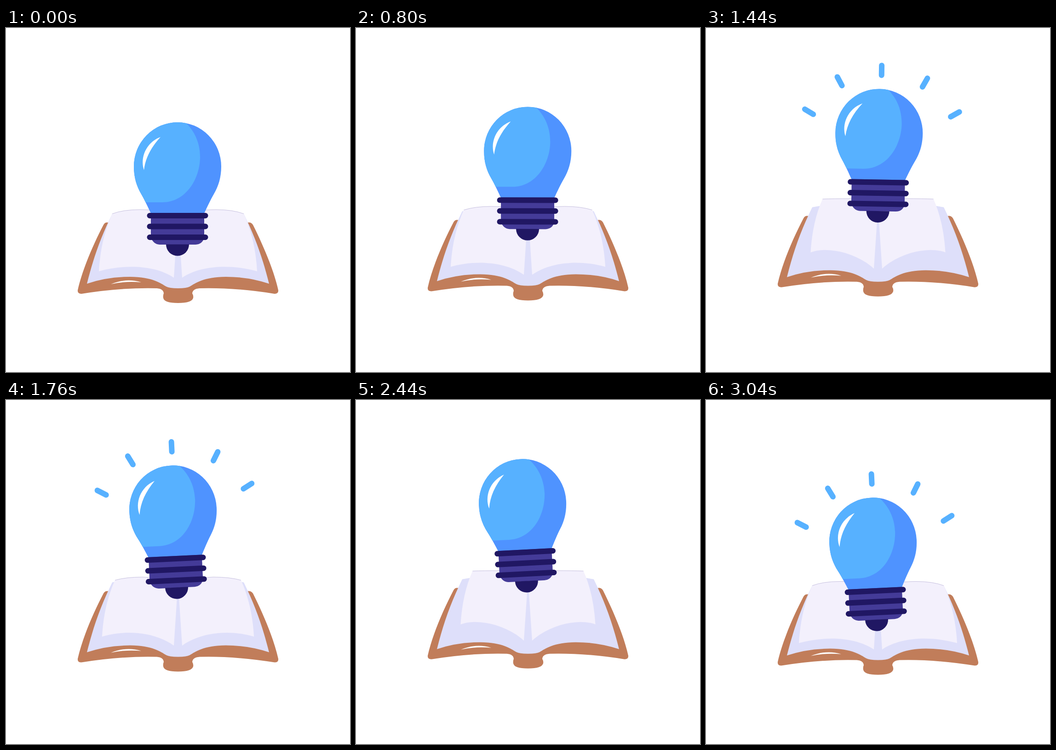
An HTML page that plays this animation: 748 by 748 pixels, repeating every 3080 ms.

```html
<!DOCTYPE html>
<html lang="en">
<head>
<meta charset="utf-8">
<title>Bulb over a book</title>
<style>
html, body { margin: 0; width: 100%; height: 100%; overflow: hidden; background: #fff; }
svg { display: block; width: 100vw; height: 100vh; }
</style>
</head>
<body>
<svg viewBox="0 0 748 748">
  <defs>
    <path id="glass" d="M315 403C309 390 301 373 294 361C284 344 278 325 278 301A95 96 0 0 1 468 301C468 325 462 344 452 361C445 373 437 390 431 403Z"/>
    <clipPath id="inside"><use href="#glass"/></clipPath>
    <g id="page">
      <path id="sheet" fill="#f3f0fc"/>
      <path id="rim" fill="none" stroke="#c6c0df"/>
    </g>
  </defs>

  <g id="book">
    <path fill="#c17d5a" d="M222 423Q215 422 212 428C190 470 166 525 156 570Q155 578 164 578Q250 564 328 566Q342 567 343 577Q341 582 342 587Q344 598 374 598Q404 598 407 587Q408 582 405 577Q406 567 421 566Q498 564 584 578Q593 578 592 570C582 525 558 470 537 428Q533 422 526 423Z"/>
    <path fill="#fff" d="M228 557Q262 543 294 553Q258 550 228 557Z"/>
    <path fill="#dedffa" d="M231 404C206 455 190 500 176 556Q220 541 270 541C318 541 338 556 348 562Q355 566 374 566Q393 566 400 562C410 556 430 541 478 541Q528 541 572 556C558 500 542 455 517 404Q480 397 450 399Q400 402 374 414Q348 402 298 399Q268 397 231 404Z"/>
    <use href="#page"/>
    <use href="#page" transform="matrix(-1 0 0 1 748 0)"/>
  </g>

  <g id="bulb">
    <g id="rays" stroke="#57b1ff" stroke-width="12" stroke-linecap="round"></g>
    <use href="#glass" fill="#4f93ff"/>
    <path clip-path="url(#inside)" fill="#57b1ff" d="M392 200V207C412 227 422 252 422 282C421 330 390 379 340 379H250V200Z"/>
    <path fill="#fff" d="M336 237C304 249 291 283 300 309C303 283 315 260 336 237Z"/>
    <path fill="#443b98" d="M315 402H431V455Q428 470 412 471H334Q320 470 315 455Z"/>
    <path stroke="#201763" stroke-width="12" stroke-linecap="round" d="M312.5 408H433.5M312.5 431.5H433.5M312.5 455H433.5"/>
    <path fill="#201763" d="M348 470.5H398A25 25 0 0 1 348 470.5Z"/>
  </g>
</svg>
<script>
const LOOP = 3080, STEP = 40;
const el = id => document.getElementById(id);

// Knots: time in ms, value
const topY = [[0, 205], [360, 128], [540, 127], [600, 129], [1000, 208], [1200, 177], [1520, 127], [1640, 128],
  [1720, 135], [1760, 142], [1970, 196], [2160, 161.5], [2400, 128], [2520, 128], [2720, 154.5], [2940, 211], [3040, 212]];
const tilt = [[0, 0], [360, -3.07], [700, 0.9], [1040, -3], [1200, -2.44], [1440, 0.9], [1760, -2.7],
  [2130, 0.9], [2160, 0.8], [2460, -3], [2720, -0.8], [2850, 0.5], [3040, -2.7]];

// Hermite curve through the knots, flat at turning points
function curve(knots, t) {
  const last = knots.length - 1;
  const slope = i => {
    if (i === 0 || i === last) return 0;
    const [a, b, c] = knots.slice(i - 1, i + 2);
    const left = (b[1] - a[1]) / (b[0] - a[0]), right = (c[1] - b[1]) / (c[0] - b[0]);
    return left * right > 0 ? 2 * left * right / (left + right) : 0;
  };
  let i = 0;
  while (i < last - 1 && t >= knots[i + 1][0]) i++;
  const [t0, v0] = knots[i], [t1, v1] = knots[i + 1];
  const d = t1 - t0, u = Math.min(1, (t - t0) / d), w = 1 - u;
  return v0 * w * w * (1 + 2 * u) + v1 * u * u * (3 - 2 * u) + d * u * w * (slope(i) * w - slope(i + 1) * u);
}

el("rays").innerHTML = [[220, 257, 30], [285.5, 189.7, 61], [376.5, 164.5, 90], [471, 189.6, 119], [537.5, 257.7, 150]]
  .map(([x, y, a]) => `<path d="M-10.7 0H10.7" transform="translate(${x} ${y}) rotate(${a})"/>`).join("");

function drawBook(t) {
  const p = t % 1000 / 1000;
  const lift = 7.3 * (1 - Math.cos(2 * Math.PI * (Math.min(p, 1 - p) + 0.012)));
  const s = lift * lift / 8;   // how far the loose pages draw in
  const x = 231 + 0.88 * s, y = 404 - 0.7 * s, peak = 395 - 0.38 * s;
  const edge = `M${x} ${y}Q${x + 24} ${peak} ${x + 60} ${peak}Q345 ${peak} 373.5 412`;
  el("rim").setAttribute("d", edge);
  el("sheet").setAttribute("d", `${edge}L365 ${543 - 0.22 * s}C325 ${516 - 0.6 * s} 260 ${513 - 0.95 * s} ${202 + s} ${529 - 1.05 * s}Q${206 + s} ${458 - 0.9 * s} ${x} ${y}Z`);
  el("book").setAttribute("transform", `translate(0 ${-lift})`);
}

function draw(now) {
  const t = Math.floor(now % LOOP / STEP) * STEP;
  drawBook(t);
  el("bulb").setAttribute("transform", `translate(0 ${curve(topY, t) - 205}) rotate(${curve(tilt, t)} 373 512)`);
  const blink = t % 400;
  el("rays").style.display = blink >= 120 && blink < 320 ? "" : "none";
}

let start;
function tick(now) {
  start ??= now;
  draw(now - start);
  requestAnimationFrame(tick);
}
draw(0);
requestAnimationFrame(tick);
</script>
</body>
</html>
```
